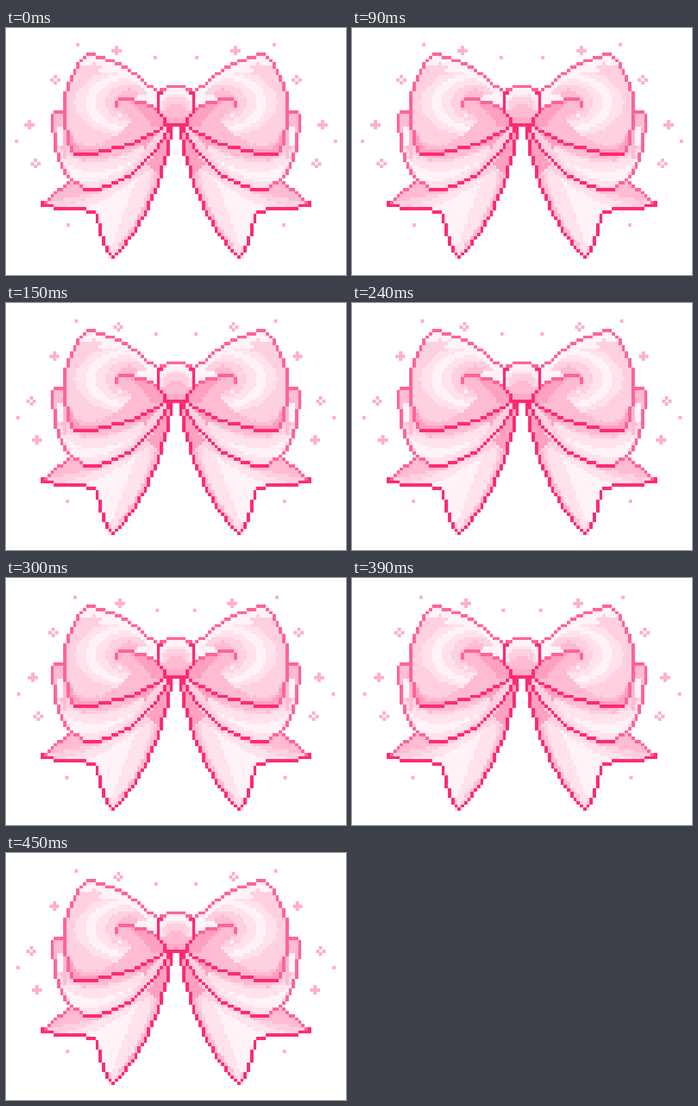
An HTML page with a canvas for the animation above (600 ms loop, 500 px wide and 363 px high).

```html
<!DOCTYPE html>
<html>
<head>
<meta charset="utf-8">
<style>
html, body { margin: 0; width: 100%; height: 100%; overflow: hidden; background: #fff; }
canvas { display: block; }
</style>
</head>
<body>
<canvas id="stage" width="500" height="363"></canvas>
<script>
const COLS = 106, ROWS = 77, CELL = 4.73;
const ctx = document.getElementById('stage').getContext('2d');
const bow = document.createElement('canvas');
bow.width = COLS;
bow.height = ROWS;
const art = bow.getContext('2d');

const WHITE = '#fff3f7', PALE = '#ffe2ec', LIGHT = '#ffd0e0', MID = '#ffbbd1',
      DEEP = '#ffa0c0', EDGE = '#ff6299', DARK = '#ff2a70', SPARK = '#ffb0cf';

// Every cell is drawn together with its mirror image.
function dot(x, y, color) {
  art.fillStyle = color;
  art.fillRect(x, y, 1, 1);
  art.fillRect(COLS - 1 - x, y, 1, 1);
}

// Traces a path one cell wide, cutting the corners of its stairs.
function trace(color, d) {
  const path = document.createElementNS('http://www.w3.org/2000/svg', 'path');
  path.setAttribute('d', d);
  const cells = [], length = path.getTotalLength();
  const touch = (a, b) => Math.abs(a[0] - b[0]) < 2 && Math.abs(a[1] - b[1]) < 2;
  for (let s = 0; s <= length + 0.1; s += 0.1) {
    const p = path.getPointAtLength(s), cell = [Math.round(p.x), Math.round(p.y)];
    if (cells.length && String(cells.at(-1)) === String(cell)) continue;
    if (cells.length > 1 && touch(cells.at(-2), cell)) cells.pop();
    cells.push(cell);
  }
  cells.forEach(([x, y]) => dot(x, y, color));
}

// Edges follow each other round the shape; shades are clipped to it.
function part(edges, base, shades) {
  const outline = edges.map(e => e[1]).join(' ').replace(/M/g, 'L').replace('L', 'M');
  const layers = [[base, outline], ...shades].map(([c, d]) => [c, new Path2D(d + 'Z')]);
  const shape = layers[0][1];
  for (let y = 0; y < ROWS; y++) {
    for (let x = 0; x < COLS / 2; x++) {
      if (!art.isPointInPath(shape, x, y)) continue;
      dot(x, y, layers.findLast(l => art.isPointInPath(l[1], x, y))[0]);
    }
  }
  edges.forEach(([color, d]) => trace(color, d));
}

const oval = (x, y, rx, ry) =>
  `M${x - rx} ${y} a${rx} ${ry} 0 1 0 ${2 * rx} 0 a${rx} ${ry} 0 1 0 ${-2 * rx} 0`;

// Tail
part([
  [EDGE, 'M20 47 L11 54'],
  [DARK, 'M11 54 L11 55'],
  [DARK, 'M11 55 L14 55 L15 56 L23 56 L27 57 L28 58 Q29 66 32 71 L33 71 Q47 56 51 31']
], LIGHT, [
  [PALE, 'M16 56 Q30 51 45 44 Q44 56 33 70 L28 57'],
  [WHITE, 'M23 56 Q32 53 40 47 Q37 55 33 66 L31 68 L28 57'],
  [MID, 'M20 47 L28 51 L12 54'],
  [MID, 'M47 40 Q45 54 35 67 L52 50'],
  [DEEP, 'M44 42 L51 30 L50 38 L47 45']
]);

// Lower loop
part([
  [EDGE, 'M24 50 Q16 46 15 34 L14 31 L14 27 L15 26 L17 26'],
  [DARK, 'M51 30 Q44 46 27 50 L24 50']
], LIGHT, [
  [PALE, 'M16 38 Q27 46 43 36 Q40 47 24 50'],
  [WHITE, 'M17 41 Q24 47 38 42 Q30 48 21 48'],
  [MID, 'M14 26 L18 26 L18 40 L15 33'],
  [WHITE, 'M16 31 L17.5 31 L17.5 37 L16 36'],
  [MID, 'M21 39 Q38 37 50 29 Q42 40 24 41'],
  [DEEP, 'M39 36 L50 29 L43 37']
]);

// Upper loop: nested ovals form the swirl, then the fold covers its right side
const swirl = [PALE, WHITE, PALE, LIGHT, MID]
  .map((c, i) => [c, oval(38, 23, 17 - 3.2 * i, 10.5 - 1.6 * i)]);
part([
  [EDGE, 'M21 39 Q18 34 18 24 Q18 16 24 8 L26 8 Q38 11 46 19'],
  [DARK, 'M49 30 Q39 37 25 39 L21 39']
], LIGHT, [
  ...swirl,
  [WHITE, 'M24 8 L26 8 Q38 11 46 19 L46 22 Q37 13 29 13 L22 11'],
  [LIGHT, 'M22 12 L27 11 L29 12 L23 17'],
  [WHITE, 'M39 22 Q43 19 47 21 L47 25'],
  [MID, 'M34 25 Q36 20 47 25 L49 30 Q40 36 28 36 Q37 33 39 28'],
  [MID, 'M18 28 Q20 36 26 37 Q38 34 47 29 L49 30 Q39 38 21 40'],
  [DEEP, 'M18 31 L22 37 L28 38 L21 40'],
  [DEEP, 'M38 22 Q46 24 50 30 L45 30']
]);
trace(EDGE, 'M34 24 L34 23 Q36 20 47 25');
dot(35, 27, WHITE);

// Knot
part([
  [EDGE, 'M53 18 L50 18 L48 19'],
  [DARK, 'M48 20 L47 20'],
  [DARK, 'M47 20 L47 26 L49 29 L50 30 L53 30']
], WHITE, [
  [PALE, oval(53, 26, 6, 6)],
  [LIGHT, oval(53, 26, 5, 5)],
  [MID, oval(53, 27, 4, 4)],
  [MID, 'M47 26 L53 26 L53 30 L48 30'],
  ['#ffabc7', 'M47 28 L53 28 L53 30 L48 30']
]);

// x, y and sideways drift per step; the right half mirrors the left.
const crosses = [[162.5, 33, 2.5], [72.5, 76, -1.5], [34.5, 142, 2.5], [43.5, 199, 2]];
const specks = [[105, 24, -2], [219, 43, 1.5], [15.5, 166, 1.5], [91, 289, -1]];

function spark(x, y) {
  const left = Math.round(x - CELL / 2), top = Math.round(y - CELL / 2);
  ctx.fillRect(left, top, 5, 5);
  ctx.fillRect(495 - left, top, 5, 5);
}

function draw(time) {
  const step = 2 - Math.abs(Math.floor(time / 150) % 4 - 2);
  const drop = Math.round(3 * Math.sin(step * Math.PI / 4)) - 1.6;
  ctx.fillStyle = '#fff';
  ctx.fillRect(0, 0, 500, 363);
  ctx.imageSmoothingEnabled = false;
  ctx.drawImage(bow, 250 - COLS * CELL / 2, drop, COLS * CELL, ROWS * CELL);

  ctx.fillStyle = SPARK;
  const place = ([x, y, drift]) => [x + drift * step, y + 2 * step];
  specks.forEach(s => spark(...place(s)));
  crosses.forEach((c, i) => {
    const [x, y] = place(c);
    for (const d of [-CELL, CELL]) {
      spark(x + d, y);
      spark(x, y + d);
    }
    if ((i + step) % 2 === 0) spark(x, y);
  });
}

const start = performance.now();
function tick() {
  draw(performance.now() - start);
  requestAnimationFrame(tick);
}
tick();
</script>
</body>
</html>
```
